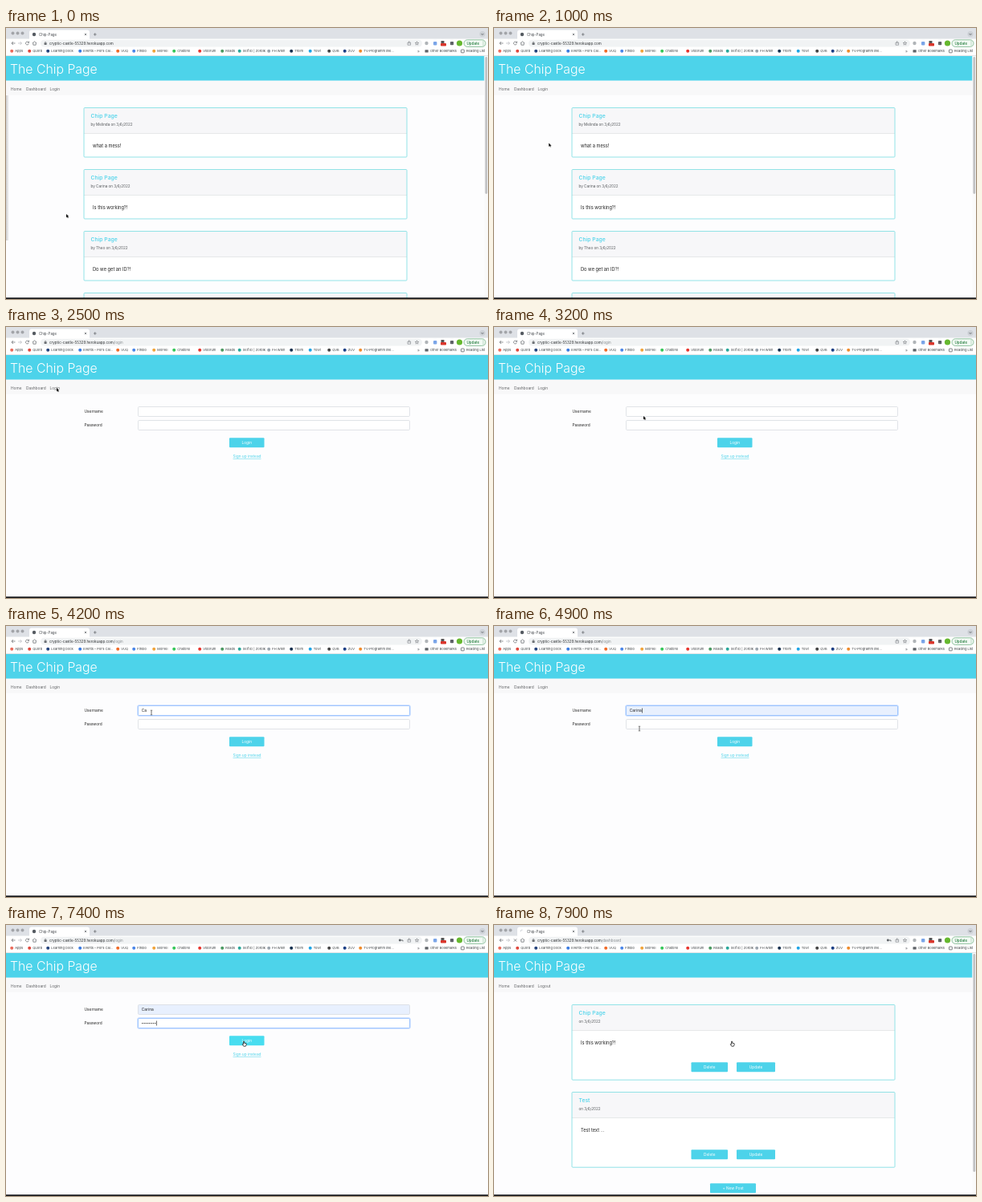
An HTML page with a canvas for the animation above (8000 ms loop, 600x338 px).

```html
<!DOCTYPE html>
<html lang="en">
<head>
<meta charset="utf-8">
<title>Chip-Page</title>
<style>
html, body { margin: 0; width: 100%; height: 100%; overflow: hidden; background: #fff; }
canvas { display: block; width: 600px; height: 338px; }
</style>
</head>
<body>
<canvas id="stage"></canvas>
<script>
const W = 600, H = 338, LOOP = 8000, STEP = 100;
const CYAN = '#4dd3ea', INK = '#222', GREY = '#5f6368';
const canvas = document.getElementById('stage');
const ctx = canvas.getContext('2d');
const dpr = window.devicePixelRatio || 1;
canvas.width = W * dpr;
canvas.height = H * dpr;

const SITE = 'Chip Page', USER = 'Carina', DATE = '3/6/2022';
const LOGIN_AT = 2500, FOCUS_AT = 3500, FILL_AT = 4600, PASS_AT = 5200, KEY_AT = 7300, DASH_AT = 7800;

const bookmarks = [
  [6, 'Apps', '#ea6b5b'], [28, 'Quorb', '#e0483e'], [51, 'Learning Dock', '#24437c'],
  [91, "Events – Plo's Cal...", '#3a7be0'], [138, 'VUQ', '#f06a28'], [158, 'Findlo', '#4a86e8'],
  [183, 'Morvel', '#f0a43a'], [208, 'Chatorel', '#35c759'], [240, 'Vidorum', '#e8352e'],
  [268, 'Roads', '#4b9a62'], [289.5, 'Self ID | Zorbik', '#2aa79a'], [326, 'FH Wien', '#9aa4ad'],
  [354, 'Trolm', '#14304f'], [377.5, 'Tolvi', '#20a5e6'], [401, 'QVB', '#444'],
  [420.5, 'ZUV', '#1b3f85'], [440, 'TV-Programm live...', '#ef8b2c']
];

const path = [
  [0, 75, 232], [400, 75, 232], [1500, 63, 76], [2500, 63, 76], [3200, 186, 111], [3400, 181, 108],
  [4200, 181, 108], [4600, 181, 128], [6800, 181, 128], [7300, 296, 147], [LOOP, 296, 147]
];

function box(x, y, w, h, fill, stroke, r = 0, line = 0.8) {
  ctx.beginPath();
  ctx.roundRect(x, y, w, h, r);
  if (fill) { ctx.fillStyle = fill; ctx.fill(); }
  if (stroke) { ctx.strokeStyle = stroke; ctx.lineWidth = line; ctx.stroke(); }
}

function dot(x, y, r, fill) {
  ctx.beginPath();
  ctx.arc(x, y, r, 0, 7);
  ctx.fillStyle = fill;
  ctx.fill();
}

function stroke(points, color = GREY, width = 0.7) {
  ctx.beginPath();
  points.forEach(([x, y], i) => i ? ctx.lineTo(x, y) : ctx.moveTo(x, y));
  ctx.strokeStyle = color;
  ctx.lineWidth = width;
  ctx.stroke();
}

function text(s, x, y, size, color = INK, weight = 400, align = 'left') {
  ctx.font = `${weight} ${size}px Inter, sans-serif`;
  ctx.textAlign = align;
  ctx.fillStyle = color;
  ctx.fillText(s, x, y);
  return ctx.measureText(s).width;
}

function cross(x, y, r) {
  stroke([[x - r, y - r], [x + r, y + r]]);
  stroke([[x + r, y - r], [x - r, y + r]]);
}

function arc(x, y, r, from, to, color = GREY) {
  ctx.beginPath();
  ctx.arc(x, y, r, from, to);
  ctx.strokeStyle = color;
  ctx.lineWidth = 0.7;
  ctx.stroke();
}

function tabBar(loading) {
  box(0, 0, W, 14, '#dee1e6');
  for (const x of [8.5, 14.5, 20.5]) dot(x, 6.5, 2, '#a3a5a9');
  box(29, 2.5, 75, 14, '#fff', null, 3);
  if (loading) arc(35, 8, 1.9, 3, 5, '#b6bcc5');
  else dot(35, 8, 2.2, '#555b61');
  text('Chip-Page', 41, 9.7, 4.4, '#45494d');
  cross(99, 8, 1.2);
  stroke([[109, 8], [112.6, 8]]);
  stroke([[110.8, 6.2], [110.8, 9.8]]);
  dot(593, 7.5, 3.6, '#cdd1d6');
  stroke([[591.5, 7], [593, 8.5], [594.5, 7]], '#44484c');
}

function toolbar(route, loading, key) {
  box(0, 13.5, W, 21, '#fff');
  stroke([[11.5, 19], [7, 19], [9, 17]]);
  stroke([[7, 19], [9, 21]]);
  stroke([[15, 19], [19.5, 19], [17.5, 17]], '#b4b7ba');
  stroke([[19.5, 19], [17.5, 21]], '#b4b7ba');
  if (loading) cross(26.5, 19, 1.7);
  else {
    arc(26.5, 19, 2, 0.4, 5.5);
    stroke([[28.6, 16.6], [28.6, 18.4], [26.9, 18.4]]);
  }
  stroke([[33, 19], [35.5, 16.8], [38, 19]]);
  stroke([[33.8, 18.5], [33.8, 21.2], [37.2, 21.2], [37.2, 18.5]]);

  box(43, 14.8, 475, 8.6, '#f1f3f4', null, 4.3);
  box(47.6, 18.5, 3, 2.4, GREY);
  arc(49.1, 18.4, 0.9, Math.PI, 0);
  const width = text('cryptic-castle-55329.herokuapp.com', 54, 20.7, 4.5, '#2b2e31');
  text(route, 54 + width, 20.7, 4.5, '#85898d');
  if (key) {
    dot(490.3, 19, 1.4, GREY);
    stroke([[490, 19], [494, 19], [494, 20.4]], GREY, 0.9);
  }
  box(500, 18, 3.6, 3.2, null, GREY, 0, 0.5);
  stroke([[501.8, 19.5], [501.8, 16.2]], GREY, 0.5);
  ctx.beginPath();
  for (let i = 0; i < 10; i++) {
    const a = i * Math.PI / 5 - Math.PI / 2, r = i % 2 ? 1 : 2.4;
    ctx.lineTo(511.5 + r * Math.cos(a), 19.2 + r * Math.sin(a));
  }
  ctx.closePath();
  ctx.lineWidth = 0.5;
  ctx.stroke();

  dot(523.5, 19, 2.2, '#b0b4b8');
  box(532, 17, 4.4, 4.4, '#7aa5e8', null, 1);
  box(541.5, 16, 4, 3.4, '#555', null, 0.5);
  box(541, 19, 7, 3.6, '#d9352b', null, 0.8);
  box(553, 17, 4.2, 4.2, '#5f6368', null, 0.8);
  dot(564.5, 19, 3.6, '#66b82f');
  box(570, 14.8, 27, 8.6, '#f2faf4', '#4a9b62', 4.3, 0.6);
  text('Update', 573.5, 20.7, 4.5, '#217a3b', 500);
  for (const y of [17, 19, 21]) dot(594, y, 0.45, '#217a3b');
}

function bookmarkBar() {
  for (const [x, label, color] of bookmarks) {
    dot(x + 1.2, 28.8, 2, color);
    text(label, x + 5.3, 30.4, 4, '#3c4043');
  }
  text('»', 512, 30.5, 5, GREY);
  box(521.5, 27.2, 4.2, 3.2, GREY, null, 0.5);
  text('Other Bookmarks', 528, 30.4, 4, '#3c4043');
  box(566.5, 27, 3.8, 3.8, null, GREY, 0.5);
  text('Reading List', 573, 30.4, 4, '#3c4043');
  box(0, 34.3, W, 0.7, '#dcdfe2');
}

function siteHeader(scrollLength, lastLink) {
  const width = scrollLength ? 595.5 : W;
  box(0, 35, W, 303, '#fdfdfe');
  box(0, 35, width, 30.8, CYAN);
  text('The ' + SITE, 5, 56.8, 15.8, '#fff', 300);
  box(0, 65.8, width, 18, '#f8f8f9');
  text('Home', 6, 77.6, 4.8, '#606264');
  text('Dashboard', 25, 77.6, 4.8, '#606264');
  text(lastLink, 54.5, 77.6, 4.8, '#606264');
  if (scrollLength) {
    box(595.5, 35, 4.5, 302, '#fafafa');
    box(596.4, 36, 2.8, scrollLength, '#c1c2c4', null, 1.4);
  }
}

function card(y, height, title, meta, body) {
  box(97, y, 402, height, '#fff', null, 1);
  box(97, y, 402, 32, '#f7f7f9', null, 1);
  box(97, y + 31.6, 402, 0.7, '#dfe2e3');
  box(97, y, 402, height, null, '#86e0e5', 1, 0.9);
  text(title, 105.5, y + 12.4, 6.8, CYAN, 500);
  text(meta, 105.5, y + 22.2, 4.6, '#55585b');
  text(body, 108, y + 49, 5.7, INK);
}

function button(x, y, w, label, fill = CYAN) {
  box(x, y, w, 12, fill, null, 1);
  text(label, x + w / 2, y + 7.8, 4.8, '#fff', 400, 'center');
}

function homePage(t) {
  siteHeader(171, 'Login');
  const posts = [['Melinda', 'what a mess!'], [USER, 'Is this working?!'], ['Theo', 'Do we get an ID?!'], ['', '']];
  posts.forEach(([author, body], i) => card(99.5 + 77 * i, 61.5, SITE, `by ${author} on ${DATE}`, body));
  if (t < 200) {
    const shade = ctx.createLinearGradient(0, 0, 4, 0);
    shade.addColorStop(0, 'rgba(0,0,0,.2)');
    shade.addColorStop(1, 'rgba(0,0,0,0)');
    box(0, 84, 4, 181, shade);
  }
}

function field(y, focused, filled) {
  if (focused) box(164.5, y, 338, 12, null, '#c6dcff', 1.4, 2.6);
  box(164.5, y, 338, 12, filled ? '#e8f0fe' : '#fff', focused ? '#86b7fe' : '#d5d9de', 1.2, 0.7);
}

function caret(x, y, t, since) {
  if ((t - since) % 1000 < 500) box(x, y - 3, 0.6, 6, '#111');
}

function loginPage(t) {
  siteHeader(0, 'Login');
  text('Username', 97.5, 107.3, 4.8, INK);
  text('Password', 97.5, 124.2, 4.8, INK);

  const onName = t >= FOCUS_AT && t < PASS_AT, onPass = t >= PASS_AT, filled = t >= FILL_AT;
  field(99.5, onName, filled);
  field(116.5, onPass, false);

  const typed = filled ? USER.length : t >= 4200 ? 2 : t >= 3900 ? 1 : 0;
  const nameWidth = text(USER.slice(0, typed), 168.8, 107.3, 4.9, INK);
  if (onName) caret(169 + nameWidth, 105.5, t, filled ? FILL_AT : FOCUS_AT);

  const count = Math.max(0, Math.min(8, Math.floor((t - 5400) / STEP) + 1));
  for (let i = 0; i < count; i++) dot(169.8 + i * 2.27, 122.6, 0.72, '#222');
  if (onPass) caret(169 + count * 2.27, 122.5, t, count < 8 ? t : 6200);

  button(278, 138.3, 43.5, 'Login', t >= 7200 ? '#48ddf0' : CYAN);
  const label = 'Sign up instead';
  const width = text(label, 300, 163.2, 4.8, CYAN, 400, 'center');
  box(300 - width / 2, 164, width, 0.5, CYAN);
}

function dashboardPage() {
  siteHeader(272, 'Logout');
  [[SITE, 'Is this working?!'], ['Test', 'Test text ...']].forEach(([title, body], i) => {
    const y = 99.5 + 109 * i;
    card(y, 93.7, title, 'on ' + DATE, body);
    button(245.5, y + 71.7, 45.5, 'Delete');
    button(302, y + 71.7, 48, 'Update');
  });
  button(269, 322.3, 57, '+ New Post');
}

function pointerAt(t) {
  const i = path.findIndex(p => p[0] > t);
  const [t0, x0, y0] = path[i - 1], [t1, x1, y1] = path[i];
  const u = (t - t0) / (t1 - t0), e = u * u * (3 - 2 * u);
  return [x0 + (x1 - x0) * e, y0 + (y1 - y0) * e];
}

function arrow(x, y) {
  ctx.beginPath();
  [[0, 0], [0, 4.6], [1.1, 3.6], [1.9, 5.2], [2.7, 4.8], [2, 3.3], [3.4, 3.3]].forEach(([a, b]) => ctx.lineTo(x + a, y + b));
  ctx.closePath();
  ctx.strokeStyle = '#fff';
  ctx.lineWidth = 0.8;
  ctx.stroke();
  ctx.fillStyle = '#111';
  ctx.fill();
}

function hand(x, y) {
  ctx.beginPath();
  [[-0.9, -2.8], [0.1, -2.8], [0.1, -0.8], [2.6, -0.2], [2.7, 1.2], [1.9, 3.2], [-0.7, 3.2], [-2.3, 0.8], [-1.7, 0.2], [-0.9, 0.8]]
    .forEach(([a, b]) => ctx.lineTo(x + a, y + b));
  ctx.closePath();
  ctx.fillStyle = '#fff';
  ctx.fill();
  ctx.strokeStyle = '#222';
  ctx.lineWidth = 0.8;
  ctx.lineJoin = 'round';
  ctx.stroke();
}

function beam(x, y) {
  stroke([[x, y - 2.6], [x, y + 2.6]], '#333');
  for (const s of [-2.8, 2.8]) stroke([[x - 1.2, y + s], [x + 1.2, y + s]], '#333', 0.6);
}

function pointer(t) {
  const [x, y] = pointerAt(t);
  const overLink = (t >= 1400 && t < LOGIN_AT) || t >= 7200;
  if (overLink) hand(x + 0.5, y + 1);
  else if (t >= 3300 && y < 131) beam(x, y);
  else arrow(x, y);
}

function render(t) {
  ctx.setTransform(dpr, 0, 0, dpr, 0, 0);
  const dash = t >= DASH_AT, login = t >= LOGIN_AT && !dash;
  if (dash) dashboardPage();
  else if (login) loginPage(t);
  else homePage(t);
  tabBar(dash);
  toolbar(dash ? '/dashboard' : login ? '/login' : '', dash, t >= KEY_AT);
  bookmarkBar();
  box(0, 336.3, W, 1.7, '#191a1c');
  pointer(t);
}

function tick() {
  const t = performance.now() % LOOP;
  render(Math.floor(t / STEP) * STEP);
  requestAnimationFrame(tick);
}
tick();
</script>
</body>
</html>
```
